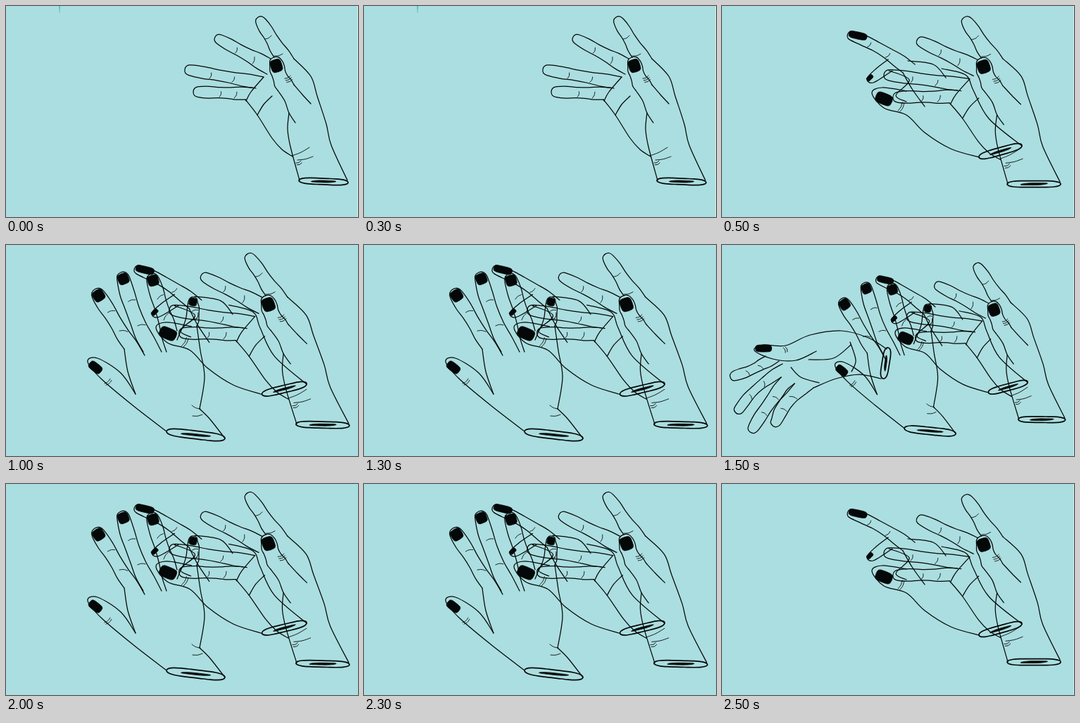
An HTML page that plays this animation: 500 px wide and 300 px high, repeating every 3000 ms.

```html
<!DOCTYPE html>
<html lang="en">
<head>
<meta charset="utf-8">
<title>Hands</title>
<style>
html, body { margin: 0; width: 100%; height: 100%; overflow: hidden; background: #abdee0; }
svg { display: block; width: 100vw; height: 100vh; }
path { fill: none; stroke: #050808; stroke-width: 1.25; stroke-linecap: round; stroke-linejoin: round; vector-effect: non-scaling-stroke; }
.solid { fill: #050808; stroke-width: .8; }
.cuff { stroke-width: 1.7; }
.fine { stroke-width: .9; }
</style>
</head>
<body>
<svg viewBox="0 0 500 300">
  <path id="drip" d="M75 0h2.2l-.9 10h-.5z" style="fill:#55c4b8;stroke:none"/>
  <rect id="edge" x="499" width="1" height="300" fill="#d9eff0"/>
  <g id="scene"><g id="right"></g><g id="pinch"></g><g id="open"></g></g>
  <g id="left"></g>
</svg>
<script>
const el = id => document.getElementById(id);
const { PI, sin, cos, abs, sign, hypot } = Math;
const mix = (p, q, s) => p.map((v, k) => v + (q[k] - v) * s);

// Smooth curve through points
function curve(p, closed) {
  const len = p.length;
  const at = i => closed ? p[(i + len) % len] : p[Math.max(0, Math.min(len - 1, i))];
  let d = 'M' + p[0];
  for (let i = 0; i < (closed ? len : len - 1); i++) {
    const [a, b, c, e] = [at(i - 1), at(i), at(i + 1), at(i + 2)];
    const c1 = b.map((v, k) => v + (c[k] - a[k]) / 6);
    const c2 = c.map((v, k) => v - (e[k] - b[k]) / 6);
    d += 'C' + [c1, c2, c];
  }
  return d + (closed ? 'Z' : '');
}

// Local axes: i runs from p to q, j runs across
function axes(p, q) {
  const len = hypot(q[0] - p[0], q[1] - p[1]);
  const u = [(q[0] - p[0]) / len, (q[1] - p[1]) / len];
  const place = (o, i, j) => [o[0] + u[0] * i - u[1] * j, o[1] + u[1] * i + u[0] * j];
  return { len, place };
}

const ring = (n, f) => Array.from({ length: n }, (_, k) => f(2 * PI * k / n));

function pen(id) {
  const add = (pts, cls = '', closed = false) => {
    const path = document.createElementNS('http://www.w3.org/2000/svg', 'path');
    path.setAttribute('d', curve(pts, closed));
    path.setAttribute('class', cls);
    el(id).append(path);
  };

  const line = text => add(text.split(' ').map(p => p.split(',').map(Number)));

  // Rounded square turned to an angle
  function nail(x, y, deg, long, wide) {
    const t = deg * PI / 180, { place } = axes([0, 0], [cos(t), sin(t)]);
    const soft = v => sign(v) * abs(v) ** .55;
    add(ring(16, a => place([x, y], soft(cos(a)) * long / 2, soft(sin(a)) * wide / 2)), 'solid', true);
  }

  function folds(x1, y1, x2, y2, count = 1) {
    const a = [x1, y1], b = [x2, y2], { place } = axes(a, b);
    for (let i = 0; i < count; i++) {
      add([place(a, 0, i * 3), place(mix(a, b, .5), 0, i * 3 + 1.2), place(b, 0, i * 3)], 'fine');
    }
  }

  // Outline from base a round the tip to base b, with bent sides and creases
  function finger(ax, ay, tx, ty, bx, by, w, { bend = 0, tipped = false, creases = [.37, .7] } = {}) {
    const a = [ax, ay], b = [bx, by], t = [tx, ty], m = mix(a, b, .5);
    const { place } = axes(m, t);
    const n = place([0, 0], 0, 1);
    const side = sign((ax - m[0]) * n[0] + (ay - m[1]) * n[1]);
    const edge = (base, dir, s) => {
      const corner = place(t, -w / 2, dir * w / 2);
      return place(mix(base, corner, s), 0, bend * 4 * s * (1 - s) + dir * w * .05 * sin(3 * PI * s));
    };
    const steps = [0, .2, .4, .6, .8, 1];
    add([
      ...steps.map(s => edge(a, side, s)),
      place(t, -w * .12, side * w * .34), t, place(t, -w * .12, -side * w * .34),
      ...steps.map(s => edge(b, -side, 1 - s))
    ]);
    for (const s of creases) {
      const p = edge(b, -side, s), q = edge(a, side, s);
      folds(...mix(p, q, .1), ...mix(p, q, .6));
    }
    if (tipped) {
      const c = place(t, -w * .55, 0);
      nail(...c, Math.atan2(ty - m[1], tx - m[0]) * 180 / PI, w * .85, w * .85);
    }
  }

  // Wavy cut end of a wrist with a bone inside
  function cuff(x1, y1, x2, y2, h) {
    const a = [x1, y1], b = [x2, y2], { len, place } = axes(a, b), mid = mix(a, b, .5);
    const oval = (long, high, wave) => ring(18, t =>
      place(mid, cos(t) * long, sin(t) * high + sin(t * 3) * wave));
    add(oval(len / 2, h, h * .12), 'cuff', true);
    add(ring(14, t => place(mid, cos(t) * len * .25, sin(t) * 1.4 - cos(t) * cos(t) * sign(cos(t)) * .8)), 'solid', true);
  }

  return { line, nail, folds, finger, cuff };
}

function drawRight({ line, nail, folds, finger, cuff }) {
  finger(381, 73, 358, 16, 409, 75, 15, { creases: [] });
  finger(376, 75, 297, 44, 371, 97, 14, { creases: [.3, .65] });
  finger(366, 101, 254, 90, 355, 117, 15);
  finger(350, 116, 266, 122, 340, 133, 15, { creases: [.25, .56] });
  finger(386, 120, 380, 73, 409, 112, 19, { creases: [], bend: -2 });
  nail(384, 85, 72, 18, 16);
  line('386,120 396,135 402,152 411,166');
  line('409,112 421,126 433,139');
  line('409,75 433,100 442,128 455,168 462,198 485,248');
  line('340,133 357,155 378,188 392,204 407,214');
  line('341,135 348,122 366,101');
  line('357,155 366,140 378,128');
  line('402,152 400,175 404,200 417,248');
  folds(396, 103, 404, 99, 3);
  folds(368, 47, 377, 42);
  folds(381, 71, 393, 68);
  folds(406, 213, 431, 201);
  folds(414, 219, 436, 214);
  folds(412, 223, 419, 220, 2);
  cuff(416, 248, 486, 251, 5);
}

function drawPinch({ line, nail, folds, finger, cuff }) {
  finger(274, 83, 179, 39, 257, 95, 13, { bend: 4 });
  nail(193, 42, 12, 26, 10);
  line('257,95 270,118 288,143');
  line('236,76 219,89 206,103 215,109 242,92');
  nail(210, 102, -45, 10, 6);
  line('264,78 300,83 318,102');
  line('237,92 266,105 247,127 262,136');
  line('312,89 346,98 357,120 379,160 426,199');
  line('262,121 227,116 213,124 230,145 262,155 288,180 325,203 365,215');
  nail(230, 132, 22, 24, 16);
  folds(250, 149, 256, 137, 2);
  cuff(365, 215, 426, 198, 6);
}

function drawOpen({ line, nail, folds, finger, cuff }) {
  finger(168, 148, 126, 63, 197, 157, 19, { tipped: true });
  finger(195, 152, 163, 39, 221, 152, 18, { tipped: true, bend: -4 });
  finger(228, 152, 206, 41, 243, 122, 18, { tipped: true });
  finger(243, 135, 267, 74, 271, 115, 13, { tipped: true, bend: 3 });
  line('168,148 173,180 184,212');
  line('271,115 276,150 282,188 275,233');
  line('275,233 290,248 311,275');
  line('184,212 163,182 130,161 116,166 135,190 180,228 228,265');
  nail(127, 174, 38, 20, 12);
  folds(140, 197, 148, 190, 2);
  folds(264, 228, 276, 233);
  folds(265, 243, 279, 241);
  cuff(228, 265, 311, 275, 6.5);
}

function drawLeft({ line, nail, folds, finger, cuff }) {
  line('134,151 105,164 72,162 46,150 58,142 90,143 125,128 170,122 208,132 234,148');
  nail(59, 147, 0, 23, 10);
  finger(62, 158, 12, 189, 81, 165, 14, { bend: -2 });
  finger(86, 169, 19, 238, 84, 188, 14, { bend: 5 });
  finger(84, 188, 40, 266, 103, 197, 15, { bend: 2 });
  finger(103, 197, 72, 257, 130, 203, 15, { bend: 5 });
  line('130,203 162,190 195,184 226,190');
  line('98,174 112,188 138,196');
  line('123,163 158,161 183,142');
  line('182,138 190,164 184,180');
  folds(90, 153, 87, 146, 2);
  cuff(236, 146, 229, 190, 6);
}

drawRight(pen('right'));
drawPinch(pen('pinch'));
drawOpen(pen('open'));
drawLeft(pen('left'));

const STEP = 500;
const ORDER = [0, 1, 2, 3, 2, 1];
const RIGHT = ['', 'matrix(1.089 -.044 -.009 1.032 -45.8 15.5)', 'matrix(1.085 -.015 .027 1.046 -46.2 1.5)'];
const PINCH = 'matrix(1.025 .027 -.058 .996 1.9 -11.7)';
const SHIFT = 'matrix(.88 -.017 0 .92 58.4 20.6)';
let last = -1;

const show = (id, on) => el(id).style.display = on ? '' : 'none';
const move = (id, m) => el(id).setAttribute('transform', m);

// Poses hold, then change at once
function draw(now) {
  const pose = ORDER[Math.floor(now / STEP) % ORDER.length];
  if (pose !== last) {
    last = pose;
    show('drip', pose === 0);
    show('edge', pose !== 2);
    show('pinch', pose > 0);
    show('open', pose > 1);
    show('left', pose > 2);
    move('right', RIGHT[Math.min(pose, 2)]);
    move('pinch', pose > 1 ? PINCH : '');
    move('scene', pose > 2 ? SHIFT : '');
  }
  requestAnimationFrame(() => draw(performance.now() - start));
}

const start = performance.now();
draw(0);
</script>
</body>
</html>
```
